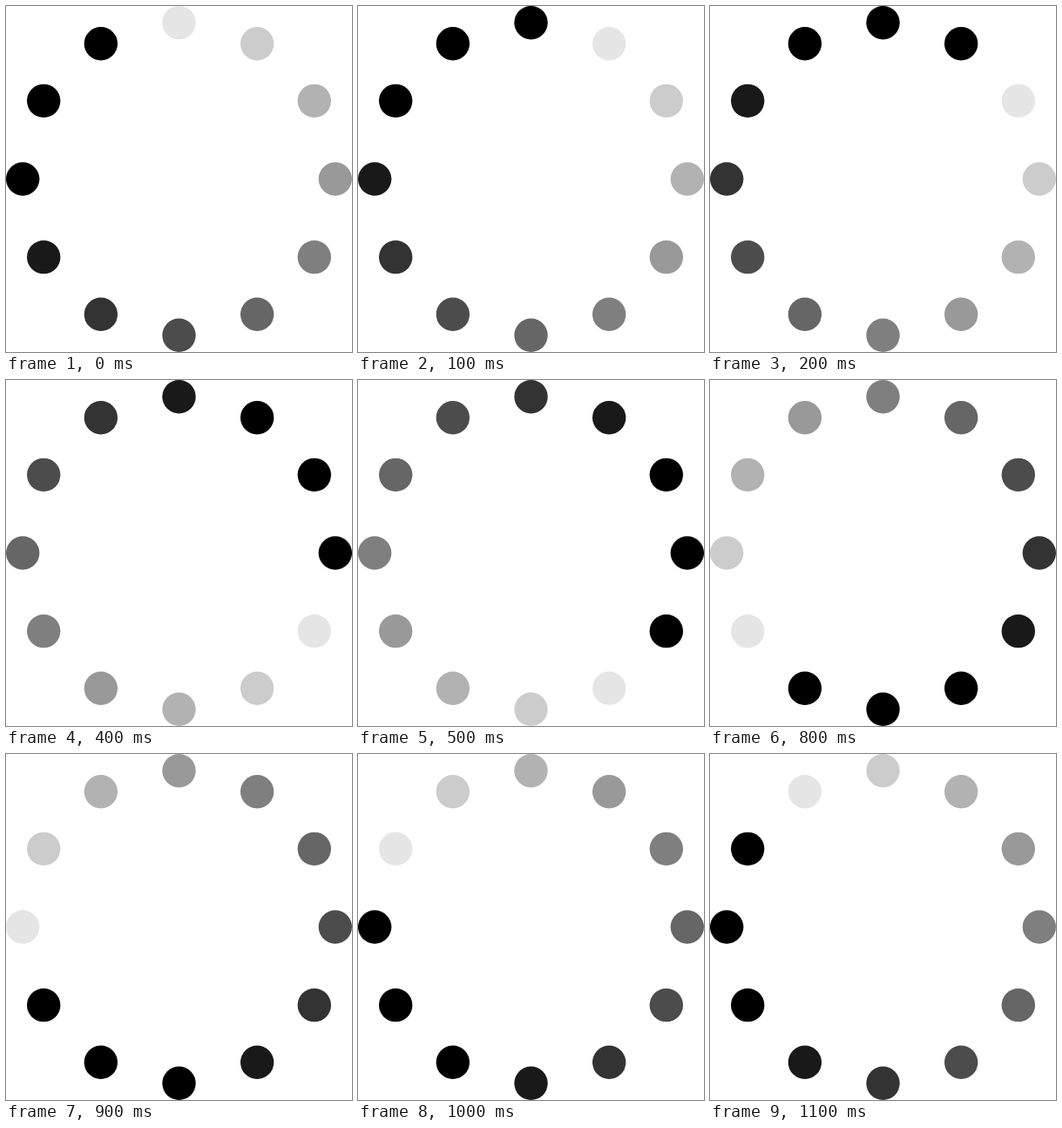
An HTML page that plays this animation: 397x397 px, repeating every 1.2 s.

```html
<!DOCTYPE html>
<html lang="en">
<head>
<meta charset="utf-8">
<title>Spinner</title>
<style>
  html, body { margin: 0; width: 100%; height: 100%; overflow: hidden; background: #fff; }
  svg { display: block; width: 397px; height: 397px; }
</style>
</head>
<body>
<svg viewBox="0 0 397 397"></svg>
<script>
const COUNT = 12, STEP_MS = 100, CENTER = 198.5, RING = 179.3, DOT = 19.2;
const svg = document.querySelector('svg');

const dots = Array.from({ length: COUNT }, (_, i) => {
  const angle = i / COUNT * 2 * Math.PI;
  const dot = document.createElementNS('http://www.w3.org/2000/svg', 'circle');
  dot.setAttribute('cx', CENTER + RING * Math.sin(angle));
  dot.setAttribute('cy', CENTER - RING * Math.cos(angle));
  dot.setAttribute('r', DOT);
  return svg.appendChild(dot);
});

// The lightest dot leads clockwise; the ones after it darken by a tenth each.
function draw(ms) {
  const step = Math.floor(ms / STEP_MS) % COUNT;
  dots.forEach((dot, i) => {
    const rank = (i - step + COUNT) % COUNT;
    const grey = Math.floor(255 * Math.max(0, 9 - rank) / 10);
    dot.setAttribute('fill', `rgb(${grey},${grey},${grey})`);
  });
}

const start = performance.now();
function tick() {
  draw(performance.now() - start);
  requestAnimationFrame(tick);
}
tick();
</script>
</body>
</html>
```
